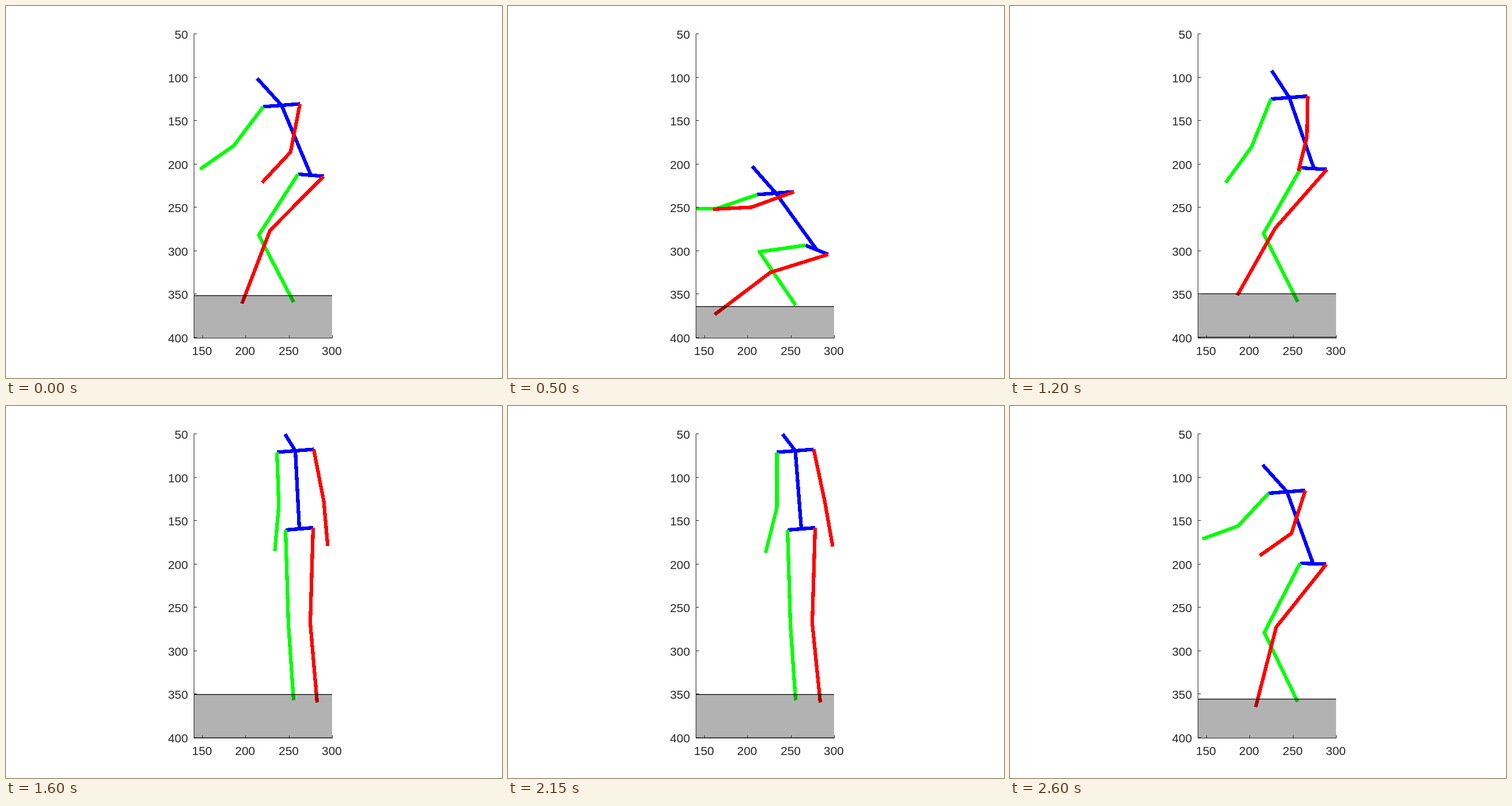
These frames come from a looping animation (864x648 px, 2.65 s). An HTML page:

```html
<!DOCTYPE html>
<html lang="en">
<head>
<meta charset="utf-8">
<title>Squat stick figure</title>
<style>
  html, body { margin: 0; width: 100%; height: 100%; overflow: hidden; background: #fff; }
  svg { display: block; }
  text { font: 20.83px "Liberation Sans", Arial, sans-serif; fill: #262626; }
  .limb { fill: none; stroke-width: 6.25; stroke-linejoin: round; shape-rendering: crispEdges; }
  .axis { fill: none; stroke: #262626; stroke-width: 1.04; }
</style>
</head>
<body>
<svg id="stage" width="864" height="648" viewBox="0 0 864 648">
  <defs><clipPath id="plot"><rect x="327" y="46" width="241" height="533"/></clipPath></defs>
  <g id="figure" clip-path="url(#plot)"></g>
  <g id="axes"></g>
</svg>
<script>
const LOOP = 2650, STEP = 50, COUNT = 52, TOP = 49, STAND = 78;
const KEYS = [0, 9, 18, 23, 31, 42, 51];

const make = (parent, tag, attrs) => {
  const el = document.createElementNS('http://www.w3.org/2000/svg', tag);
  for (const name in attrs) el.setAttribute(name, attrs[name]);
  return document.getElementById(parent).appendChild(el);
};

// Periodic monotone cubic through the values at KEYS.
function track(...values) {
  const n = KEYS.length;
  const gap = KEYS.map((k, i) => (i + 1 < n ? KEYS[i + 1] : COUNT) - k);
  const rise = values.map((v, i) => (values[(i + 1) % n] - v) / gap[i]);
  const slope = rise.map((r, i) => {
    const p = (i + n - 1) % n, q = rise[p];
    if (q * r <= 0) return 0;
    const a = 2 * gap[i] + gap[p], b = gap[i] + 2 * gap[p];
    return (a + b) / (a / q + b / r);
  });
  return step => {
    let i = n - 1;
    while (KEYS[i] > step) i--;
    const j = (i + 1) % n, h = gap[i], u = (step - KEYS[i]) / h, w = 1 - u;
    return values[i] * (1 + 2 * u) * w * w + slope[i] * h * u * w * w
         + values[j] * u * u * (3 - 2 * u) - slope[j] * h * u * u * w;
  };
}

// The neck drives the body; the right foot steps on its own.
const neckX = track(480, 466.5, 468.5, 486.5, 504, 500.5, 482.5);
const neckY = track(173, 326, 216.5, 159.5, STAND, STAND, 149.5);
const footX = track(411, 360, 378, 396, 542, 544, 428);
const footY = track(518.5, 537.5, 512, 504, 516.5, 516.5, 524.5);

// Arm angles in degrees from hanging, and how far the arm reaches.
const armL = {
  upper: track(37, 71, 52, 22, -2, 0, 43),
  fore: track(55, 89, 66, 36, 5, 14, 70),
  reach: track(0.89, 0.78, 0.79, 0.95, 0.98, 1.01, 0.82)
};
const armR = {
  upper: track(11, 70, 39, 1, -11, -12, 18),
  fore: track(43, 87, 60, 14, -5, -10, 55),
  reach: track(0.9, 0.83, 0.58, 0.75, 0.97, 0.98, 0.83)
};

const shift = ([x, y], dx, dy) => [x + dx, y + dy];
const swing = (p, deg, length) => {
  const a = deg * Math.PI / 180;
  return shift(p, -Math.sin(a) * length, Math.cos(a) * length);
};
const armPoints = (shoulder, { upper, fore, reach }, step) => {
  const elbow = swing(shoulder, upper(step), 95 * reach(step));
  return [shoulder, elbow, swing(elbow, fore(step), 81 * reach(step))];
};

function pose(step) {
  const neck = [neckX(step), neckY(step)];
  const depth = neck[1] - STAND;
  const fold = rate => 1 - Math.exp(-depth / rate);

  const lean = 36 + 7 * Math.cos(2 * Math.PI * (step - 3) / COUNT);
  const visible = Math.min(1, (neck[1] - TOP) / 47);
  const head = shift(neck, -lean * visible, -47 * visible);
  const shoulderL = shift(neck, -32, 2.5), shoulderR = shift(neck, 32, -2.5);

  const pelvis = [511 + 28 * fold(75), 214 + 0.85 * depth];
  const hx = 24 - 0.017 * depth, hy = 0.04 * depth - 2;
  const hipL = shift(pelvis, -hx, -hy), hipR = shift(pelvis, hx, hy);
  const kneeL = [492 - 54 * fold(30), 381 + 0.19 * depth];
  const kneeR = [530 - 73 * fold(30), 378 + 0.0014 * depth ** 2];
  const ankleL = [501, 512.5 + 0.035 * depth];
  const ankleR = [footX(step), footY(step)];

  return {
    floor: Math.max(ankleL[1], ankleR[1]) - 14,
    limbs: [
      [head, neck, pelvis],
      [shoulderL, shoulderR],
      [hipL, hipR],
      armPoints(shoulderL, armL, step),
      [hipL, kneeL, ankleL],
      armPoints(shoulderR, armR, step),
      [hipR, kneeR, ankleR]
    ]
  };
}

const lines = ['#00f', '#00f', '#00f', '#0f0', '#0f0', '#f00', '#f00']
  .map(stroke => make('figure', 'polyline', { class: 'limb', stroke }));
const ground = make('figure', 'rect', {
  x: 300, width: 300, height: 75.6, fill: '#000', 'fill-opacity': 0.3, stroke: '#000', 'stroke-width': 1.25
});

make('axes', 'path', { class: 'axis', d: 'M327.5 48.5V578.5H568.5' });
for (let v = 50; v <= 400; v += 50) {
  const y = Math.round(49 + (v - 50) * 1.511) - 0.5;
  make('axes', 'path', { class: 'axis', d: `M327.5 ${y}h5` });
  make('axes', 'text', { x: 317, y: y + 8.5, 'text-anchor': 'end' }).textContent = v;
}
for (let v = 150; v <= 300; v += 50) {
  const x = Math.round(342 + (v - 150) * 1.506) + 0.5;
  make('axes', 'path', { class: 'axis', d: `M${x} 578.5v-5` });
  make('axes', 'text', { x: x - 1, y: 607.5, 'text-anchor': 'middle' }).textContent = v;
}

function draw(now) {
  // The first pose is held for two steps.
  const step = Math.max(0, Math.floor((now % LOOP) / STEP) - 1);
  const { floor, limbs } = pose(step);
  limbs.forEach((points, i) => {
    lines[i].setAttribute('points', points.map(p => p.map(c => c.toFixed(2))).join(' '));
  });
  ground.setAttribute('y', floor.toFixed(2));
}

const start = performance.now();
function tick() {
  draw(performance.now() - start);
  requestAnimationFrame(tick);
}
tick();
</script>
</body>
</html>
```
